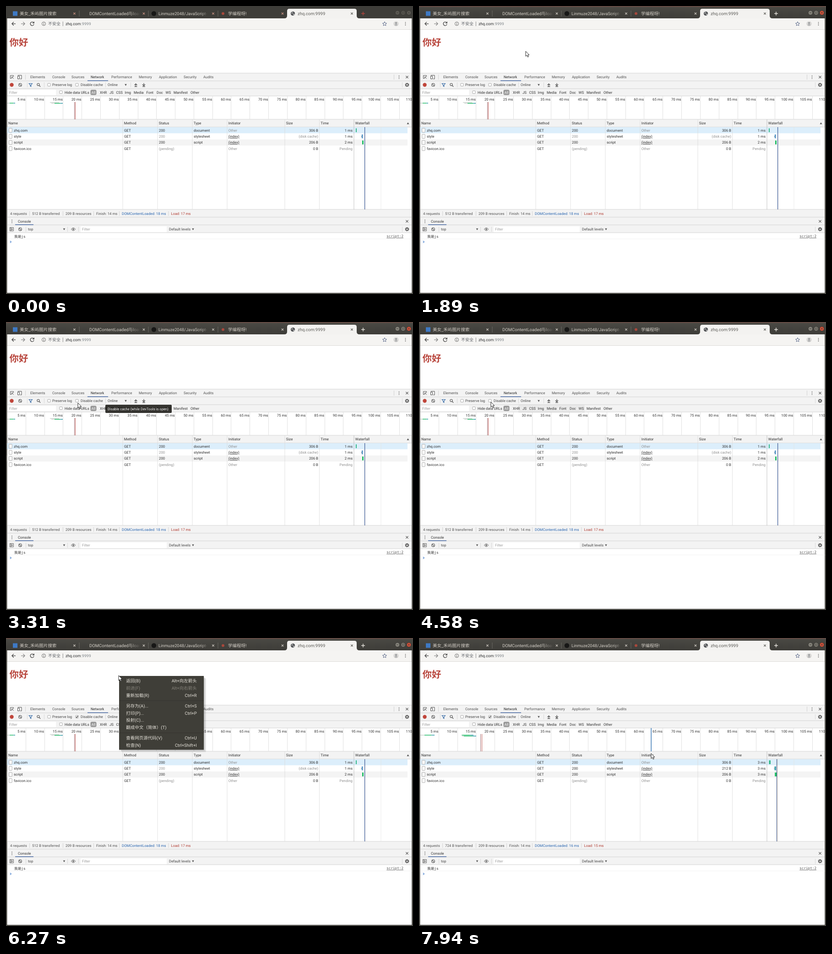
An HTML page that plays this animation: 889x630 px, repeating every 8000 ms.

```html
<!DOCTYPE html>
<html lang="zh">
<head>
<meta charset="utf-8">
<title>Network panel</title>
<style>
html, body { margin: 0; width: 100%; height: 100%; overflow: hidden; background: #3c3b37; }
svg {
  display: block; width: 889px; height: 630px;
  font-family: Roboto, "Noto Sans CJK SC", "Noto Sans CJK", sans-serif;
  font-size: 7.85px; text-rendering: geometricPrecision;
}
</style>
</head>
<body>
<svg id="stage" viewBox="0 0 889 630" xmlns="http://www.w3.org/2000/svg">
  <defs>
    <linearGradient id="strip" x2="0" y2="1">
      <stop offset="0" stop-color="#55534d"/><stop offset=".15" stop-color="#494843"/><stop offset="1" stop-color="#3d3c38"/>
    </linearGradient>
  </defs>
</svg>
<script>
const NS = 'http://www.w3.org/2000/svg';
const LOOP = 8000;
const stage = document.getElementById('stage');
let layer = stage;

function add(tag, attrs, parent = layer) {
  const el = document.createElementNS(NS, tag);
  for (const k in attrs) el.setAttribute(k, attrs[k]);
  parent.appendChild(el);
  return el;
}
const rect = (x, y, w, h, fill, more) => add('rect', { x, y, width: w, height: h, fill, ...more });
const circle = (cx, cy, r, fill, more) => add('circle', { cx, cy, r, fill, ...more });
const path = (d, stroke = '#5a5a5a', width = 1, more) => add('path', { d, stroke, 'stroke-width': width, fill: 'none', ...more });
const text = (x, y, s, fill = '#303030', more) => {
  const el = add('text', { x, y, fill, ...more });
  el.textContent = s;
  return el;
};
const right = { 'text-anchor': 'end' };
const group = draw => {
  const g = add('g', {}, stage), outer = layer;
  layer = g;
  draw();
  layer = outer;
  return g;
};
const show = (el, on) => el.setAttribute('visibility', on ? 'visible' : 'hidden');
const cross = (x, y, r, color) => path(`M${x - r} ${y - r}l${2 * r} ${2 * r}m0 ${-2 * r}l${-2 * r} ${2 * r}`, color, 1.1);
const dots = (x, y, color = '#555') => [-3, 0, 3].forEach(d => circle(x, y + d, 0.85, color));
const arrowDown = (x, y) => path(`M${x - 2.3} ${y - 1.8}h4.6l-2.3 4z`, 'none', 0, { fill: '#555' });
const banned = (x, y) => {
  circle(x, y, 3.3, 'none', { stroke: '#555', 'stroke-width': 1.1 });
  path(`M${x - 2.3} ${y - 2.3}l4.6 4.6`, '#555', 1.1);
};
const gear = (x, y) => {
  circle(x, y, 2.6, 'none', { stroke: '#5a5a5a', 'stroke-width': 1.9 });
  circle(x, y, 3.9, 'none', { stroke: '#5a5a5a', 'stroke-width': 1.2, 'stroke-dasharray': '1.5 1.56' });
};
const checkbox = (x, y) => rect(x - 3, y - 3, 6, 6, '#fff', { stroke: '#999', 'stroke-width': 0.8, rx: 1 });
const fade = (id, from, to) => {
  const g = add('linearGradient', { id, gradientUnits: 'userSpaceOnUse', x1: from, x2: to, y1: 0, y2: 0 });
  add('stop', { offset: 0, 'stop-color': '#d3cec6' }, g);
  add('stop', { offset: 1, 'stop-color': '#d3cec6', 'stop-opacity': 0 }, g);
  return `url(#${id})`;
};

// Window frame and browser tabs
rect(0, 0, 889, 630, '#4a4944');
rect(0, 0, 889, 27, '#3e3d39');
const focusStrip = group(() => {
  rect(0, 0, 889, 27, 'url(#strip)');
  rect(1, 0.6, 887, 1, '#74443c');
});
const tabText = { 'font-size': 9.5 };
text(30, 20, '美女_禾屿图片搜索', '#d3cec6', tabText);
text(182, 20, 'DOMContentLoaded与load', fade('fadeA', 270, 293), tabText);
text(333, 20, 'Linmuze2048/JavaScript-', fade('fadeB', 424, 443), { 'font-size': 9.3 });
text(485, 20, '学编程呀!', '#d3cec6', tabText);
rect(15, 11.5, 10, 10, '#3e79c4');
circle(323, 16.5, 5.2, '#171716');
circle(474, 16.5, 3, '#a8483c');
[160, 311, 463].forEach(x => rect(x - 0.5, 10, 1, 13, '#6b6963'));
path('M608 27q6 0 6-6v-10q0-5 5-5h142q5 0 5 5v10q0 6 6 6z', 'none', 0, { fill: '#f3f2f0' });
text(637, 19.8, 'zhq.com:9999', '#5c5b57', tabText);
cross(755.5, 16.5, 2.2, '#55544f');
circle(626.5, 16.5, 4.6, '#4b4d50');
path('M623.5 14q2-1.5 3 0t-1 2.5l-2.5-.5M627 18.5l2-1.5 1 1-1.5 2z', '#f3f2f0', 0.9);

const stripButtons = (plain, close, plus, tabClose) => group(() => {
  path('M776 16.5h8m-4-4v8', plus, 1.4);
  [149.5, 301, 452.5, 604].forEach(x => cross(x, 16.5, 2.2, tabClose));
  [855, 867.5, 880].forEach((x, i) => circle(x, 14.8, 4.8, i < 2 ? plain : close, { stroke: '#33322e', 'stroke-width': 0.8 }));
  path('M852.8 14.8h4.4M865.5 13h4v3.6h-4zM878.2 13l3.6 3.6m0-3.6l-3.6 3.6', '#3a3934', 0.9);
});
const idle = stripButtons('#5b5953', '#5b5953', '#b5443c', '#cf9585');
const focused = stripButtons('#85837b', '#d2513a', '#e8e5df', '#d3cec6');

// Address bar
rect(2.5, 27, 884, 24, '#f5f4f2');
rect(2.5, 51, 884, 1, '#dcdad7');
path('M21 38.8h-8m3.8-3.9l-3.9 3.9 3.9 3.9', '#454545', 1.3);
path('M33 38.8h8m-3.8-3.9l3.9 3.9-3.9 3.9', '#8a8a8a', 1.3);
path('M60.3 36.4a4 4 0 1 0 .7 3.4M61.2 34.2v3.2h-3.2', '#454545', 1.3);
circle(82.5, 38.8, 4, 'none', { stroke: '#5c5c5c', 'stroke-width': 0.9 });
path('M82.5 36.3v1.1m0 .9v3', '#5c5c5c', 1);
text(92, 42, '不安全', '#5f6368', { 'font-size': 9 });
rect(123.8, 34, 1, 10, '#8d8d8d');
text(130, 41.8, 'zhq.com', '#26282a', { 'font-size': 8.7 });
text(164, 41.8, ':9999', '#80868b', { 'font-size': 8.7 });
path('M827 34.4l1.3 3 3.2.3-2.4 2.1.7 3.2-2.8-1.7-2.8 1.7.7-3.2-2.4-2.1 3.2-.3z', '#4c5c80', 0.9);
circle(852, 38.8, 5.6, '#d8d7d5');
circle(852, 37.2, 1.7, '#85888b');
path('M848.8 42q3.2-3.6 6.4 0z', 'none', 0, { fill: '#85888b' });
dots(872.5, 38.8);

// Page
rect(2.5, 52, 884, 95, '#fff');
text(7.6, 87, '你好', '#b8453c', { 'font-size': 20.4, 'font-weight': 700 });

// Panel backgrounds
rect(2.5, 147, 884, 50, '#f3f3f3');
rect(2.5, 197, 884, 51, '#fff');
rect(2.5, 248, 884, 17, '#f3f3f3');
rect(2.5, 265, 884, 180, '#fff');
rect(2.5, 445, 884, 51, '#f3f3f3');
rect(2.5, 496, 884, 131.5, '#fff');
[146.5, 163.5, 180.5, 196.5, 247.5, 264.5, 444.5, 461.5, 478.5, 495.5].forEach(y => rect(2.5, y, 884, 0.8, '#cbcbcb'));

// Panel tabs
const tabs = [['Elements', 53], ['Console', 101], ['Sources', 143], ['Network', 185], ['Performance', 230],
  ['Memory', 290], ['Application', 334], ['Security', 388], ['Audits', 431]];
const hover = rect(0, 147, 0, 16.5, '#e6e6e6');
tabs.forEach(([s, x]) => text(x, 158.3, s, s === 'Network' ? '#222' : '#505050'));
rect(178, 162.7, 45, 1.4, '#3c5f9c');
path('M12 158.5h-2.5v-6.5h7v2.5M12.5 155l4.2 4.2m-4.2-1v-3.2h3.2', '#555', 1);
path('M26 152.5v-1h8v8h-3M25.5 153.5h4v6h-4z', '#555', 1);
rect(42, 150, 0.8, 11, '#ccc');
rect(847, 150, 0.8, 11, '#ccc');
dots(858.5, 155.5);
cross(876, 155.5, 2.7, '#555');

// Network toolbar
circle(12.5, 172.5, 4.2, '#c0453a');
banned(31, 172.5);
path('M50.3 169.5h7l-2.7 3.4v3.2l-1.6-1v-2.2z', '#3c6ea8', 1.2);
circle(70.5, 171.8, 2.6, 'none', { stroke: '#555', 'stroke-width': 1.1 });
path('M72.4 173.7l2.8 2.8', '#555', 1.3);
checkbox(94, 172.3);
text(101, 175.2, 'Preserve log', '#454545');
checkbox(155, 172.3);
const tick = path('M153 172.3l1.6 1.7 2.6-3.6', '#333', 1.2);
text(163, 175.2, 'Disable cache', '#454545');
text(222, 175.2, 'Online', '#454545');
arrowDown(261.5, 172.5);
path('M283.5 176v-5m-3 2.3l3-3.2 3 3.2M280.5 176.3h6', '#555', 1.3);
path('M301 168.8v5m-3-2.3l3 3.2 3-3.2M298 176.3h6', '#555', 1.3);
[46, 83, 217, 272, 865].forEach(x => rect(x, 167, 0.8, 11, '#d2d2d2'));
gear(876, 172.5);

// Filter row
rect(3, 183, 106, 12, '#fff');
text(7, 191.7, 'Filter', '#9a9a9a');
checkbox(120, 188.5);
text(128, 191.7, 'Hide data URLs');
rect(184.5, 183.2, 13, 11.6, '#969696', { rx: 3 });
text(191, 191.7, 'All', '#fff', { 'text-anchor': 'middle' });
[['XHR', 205], ['JS', 226], ['CSS', 240.5], ['Img', 259.5], ['Media', 279], ['Font', 306.5], ['Doc', 329],
  ['WS', 348.5], ['Manifest', 366], ['Other', 403]].forEach(([s, x]) => text(x, 191.7, s));

// Overview scale
for (let i = 0; i < 21; i++) {
  const x = 43.2 + 40.8 * i;
  rect(Math.floor(x), 197, 1, 51, '#e0e0e0');
  text(x - 1, 206.7, `${5 * (i + 1)} ms`, '#303030', right);
}
text(873.5, 206.7, '110');
rect(886.5, 27, 2.5, 603, '#4a4944');
const scanLine = rect(0, 197, 1.5, 51, '#3c78b4');

// Request table
const columns = [['Name', 2], ['Method', 255], ['Status', 331], ['Type', 407], ['Initiator', 483],
  ['Size', 609], ['Time', 684.5], ['Waterfall', 760]];
rect(2.5, 265, 874.5, 13.4, '#dceefb');
rect(2.5, 291.8, 874.5, 13.4, '#f4f4f4');
columns.forEach(([s, x], i) => {
  text(x + (i ? 2.8 : 3), 259.3, s);
  if (i) rect(x - 0.4, 248, 0.8, 197, i === 7 ? '#b5b5b5' : '#dadada');
});
rect(818.6, 265, 0.8, 180, '#e4e4e4');
path('M875.5 258.5h5l-2.5-4z', 'none', 0, { fill: '#555' });
const rowY = i => 274.6 + 13.35 * i;
['zhq.com', 'style', 'script', 'favicon.ico'].forEach((name, i) => {
  const y = rowY(i), link = i === 1 || i === 2;
  rect(6.6, y - 7.2, 6.6, 8.8, '#fff', { stroke: '#999', 'stroke-width': 0.8, rx: 0.8 });
  text(17, y, name);
  text(258, y, 'GET');
  if (i !== 1) text(334, y, i < 3 ? '200' : '(pending)', i < 3 ? '#303030' : '#909090');
  text(410, y, ['document', 'stylesheet', 'script', ''][i]);
  text(485.7, y, link ? '(index)' : 'Other', link ? '#303030' : '#909090', link ? { 'text-decoration': 'underline' } : {});
});
text(682, rowY(0), '306 B', '#303030', right);
text(682, rowY(2), '206 B', '#303030', right);
text(682, rowY(3), '0 B', '#303030', right);
text(757, rowY(3), 'Pending', '#909090', right);

// Status bar
text(9, 456.8, '4 requests', '#505050');
text(130, 456.8, '209 B resources', '#505050');
text(197, 456.8, 'Finish: 14 ms', '#505050');
[51, 124, 191, 247, 354.5].forEach(x => rect(x, 449, 0.8, 10, '#ccc'));

// Results of one page load
function results(r) {
  return group(() => {
    text(334, rowY(1), '200', r.sizeColor);
    text(682, rowY(1), r.size, r.sizeColor, right);
    r.times.forEach((s, i) => text(757, rowY(i), `${s} ms`, '#303030', right));
    text(57, 456.8, `${r.sent} B transferred`, '#505050');
    text(253, 456.8, `DOMContentLoaded: ${r.dcl} ms`, '#2a66b0');
    text(360.5, 456.8, `Load: ${r.load} ms`, '#b03a30');
    r.spans.forEach(([x, mid, end, y]) => {
      rect(x, y, mid - x, 1, '#b9c3bd');
      rect(mid, y - 0.3, (end - mid) * 0.7, 1.6, '#2fbf71');
      rect(mid + (end - mid) * 0.7, y - 0.3, (end - mid) * 0.3, 1.6, '#3fa0b0');
    });
    r.marks.forEach((x, i) => rect(x, 210, 1, 38, i ? '#c0605a' : '#a5767a'));
    r.bars.forEach(([x, w, fill], i) => rect(x, 267.6 + 13.35 * i, w, 8.4, fill));
    rect(r.bars[1][0] - 1, 284, 1, 3, '#a8a8a8');
    rect(r.line, 265, 1, 180, '#3c5f9c');
    rect(r.line + 1, 265, 0.5, 180, r.edge);
  });
}
const before = results({
  size: '(disk cache)', sizeColor: '#909090', times: [1, 1, 2], sent: 512, dcl: 18, load: 17,
  spans: [[3, 8, 20, 212], [96, 116, 116, 210.5], [99, 106, 124, 212.3]], marks: [149, 151],
  bars: [[764, 2, '#35b88a'], [777, 2.4, '#4a8fc4'], [778, 3, '#1fbd63']], line: 783, edge: '#9a9ab0'
});
const after = results({
  size: '212 B', sizeColor: '#303030', times: [3, 3, 3], sent: 724, dcl: 16, load: 15,
  spans: [[3, 12, 34, 212], [92, 94, 119, 212], [94, 98, 125, 214]], marks: [134, 137],
  bars: [[764.5, 3.5, '#35b88a'], [776.5, 3.5, '#3f9fae'], [777.2, 3.8, '#1fbd63']], line: 781, edge: '#a8845c'
});

// Console drawer
dots(13, 471);
text(26, 473.8, 'Console', '#303030');
rect(20, 477.7, 40, 1.4, '#3c5f9c');
cross(876, 471, 2.7, '#555');
path('M8.3 484.5h8v7.5h-8zM10.5 484.5v7.5M12.3 486.3l2.6 2-2.6 2z', '#555', 0.9);
banned(31, 488.3);
text(48, 491.2, 'top', '#454545');
arrowDown(127, 488.3);
path('M142.5 488.3q4.5-6 9 0q-4.5 6-9 0z', '#555', 1);
circle(147, 488.3, 1.5, '#555');
rect(163, 482, 188, 13, '#fff');
text(166, 491.2, 'Filter', '#9a9a9a');
text(356, 491.2, 'Default levels', '#454545');
arrowDown(408.5, 488.3);
[43, 134, 158, 865].forEach(x => rect(x, 483, 0.8, 11, '#d2d2d2'));
gear(876, 488.3);
const mono = { 'font-family': '"DejaVu Sans Mono", "Noto Sans CJK SC", "Noto Sans CJK", monospace', 'font-size': 7.65 };
text(18, 506.5, '我是js', '#303030', mono);
text(868, 506.3, 'script:2', '#555', { ...mono, ...right, 'text-decoration': 'underline' });
rect(2.5, 509.3, 884, 0.8, '#efefef');
path('M8.8 513.8l2.6 2.2-2.6 2.2', '#3c78c8', 1.1);

// Tooltip
const tip = group(() => {
  rect(217, 181, 145, 18, '#14130f', { rx: 2 });
  text(222, 192.8, 'Disable cache (while DevTools is open)', '#fff', { 'font-size': 7.7 });
});

// Context menu
let lit;
const menu = group(() => {
  [5, 3, 1].forEach(d => rect(247 + d, 83 + d, 185, 161.5, '#000', { opacity: 0.09, rx: 2 }));
  rect(247, 83, 185, 161.5, '#3f3e38');
  lit = rect(247, 0, 184, 16, '#ec7646');
  [136.5, 207].forEach(y => rect(247, y, 185, 0.8, '#34332e'));
  [['返回(B)', 'Alt+向左箭头', 94], ['前进(F)', 'Alt+向右箭头', 110], ['重新加载(R)', 'Ctrl+R', 125.5],
    ['另存为(A)...', 'Ctrl+S', 148.3], ['打印(P)...', 'Ctrl+P', 164.2], ['投射(C)...', '', 180],
    ['翻成中文（简体）(T)', '', 196], ['查看网页源代码(V)', 'Ctrl+U', 218.5], ['检查(N)', 'Ctrl+Shift+I', 234.5]
  ].forEach(([s, key, y], i) => {
    const c = i === 1 ? '#85827a' : '#e6e2da';
    text(262.3, y + 3.3, s, c, tabText);
    text(416.7, y + 3.3, key, c, { ...tabText, ...right });
  });
});

const cursor = add('path', {
  d: 'M0 0V11L2.6 8.7 4.4 12.7 6.3 11.9 4.6 8H7.8Z', fill: '#fff', stroke: '#111', 'stroke-width': 0.9
});

// Pointer legs: start, end, steps, bend x y, goal x y
const legs = [
  [660, 1400, 16, 150, -40, 233, 99],
  [2080, 2160, 3, 255, 125, 284, 138],
  [2340, 3010, 17, 228, 188, 157, 175],
  [3260, 3310, 2, 157, 176, 157, 177],
  [3580, 3581, 1, 157, 176, 157, 175],
  [4930, 5090, 5, 163, 175, 160, 174],
  [5560, 6190, 14, 120, 125, 246, 82],
  [6390, 6510, 4, 275, 98, 300, 119],
  [6670, 6710, 2, 298, 121, 297, 122],
  [7250, 7940, 15, 400, 185, 507, 252.5]
];
function pointer(t) {
  let x = 900, y = 258;
  for (const [t0, t1, n, bx, by, gx, gy] of legs) {
    if (t < t0) break;
    const step = n > 1 ? Math.floor((t - t0) / (t1 - t0) * (n - 1) + 1e-6) : 0;
    const u = Math.min(1, (step + 1) / n), v = 1 - u;
    x = v * v * x + 2 * u * v * bx + u * u * gx;
    y = v * v * y + 2 * u * v * by + u * u * gy;
  }
  return [x, y];
}

const HOVER_LAG = 170;
const tabLeft = i => (tabs[i]?.[1] ?? 468) - 7;
function hoverTab(t) {
  const [x, y] = pointer(t - HOVER_LAG);
  const i = y > 147 && y < 164 ? tabs.findIndex((_, k) => x >= tabLeft(k) && x < tabLeft(k + 1)) : -1;
  show(hover, i >= 0);
  if (i < 0) return;
  hover.setAttribute('x', tabLeft(i));
  hover.setAttribute('width', tabLeft(i + 1) - tabLeft(i));
}

function render(t) {
  const [x, y] = pointer(t);
  const active = t >= 1890;
  show(idle, !active);
  show(focused, active);
  show(focusStrip, active);
  show(cursor, t >= 660);
  cursor.setAttribute('transform', `translate(${x.toFixed(2)} ${y.toFixed(2)})`);
  hoverTab(t);
  show(scanLine, t >= 660 && y > 197);
  scanLine.setAttribute('x', x - 0.6);
  show(tick, t >= 5010);
  tip.setAttribute('opacity', t < 2780 || t >= 4620 ? 0 : t < 4580 ? 0.85 : 0.04);
  menu.setAttribute('display', t >= 6220 && t < 6950 ? 'inline' : 'none');
  const row = t < 6390 ? -1 : y < 102 ? 0 : y < 117 ? 1 : 2;
  lit.setAttribute('y', 86 + 15.7 * row);
  lit.setAttribute('opacity', row === 0 || row === 2 ? 1 : 0);
  show(before, t < 7000);
  show(after, t >= 7000);
}

const start = performance.now();
function tickFrame(now) {
  render(Math.max(0, now - start) % LOOP);
  requestAnimationFrame(tickFrame);
}
render(0);
requestAnimationFrame(tickFrame);
</script>
</body>
</html>
```
